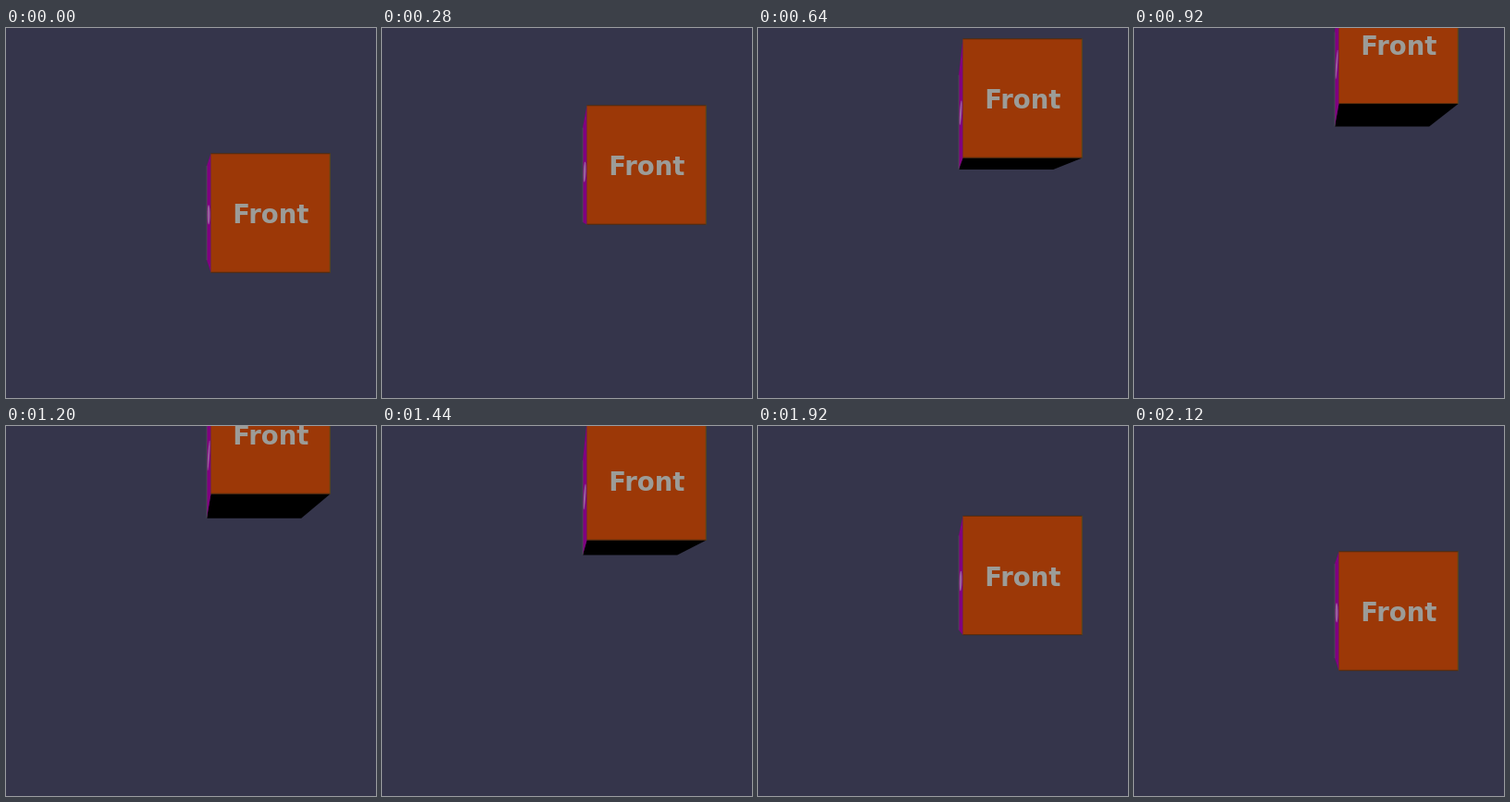
Write an HTML page that moves like this. It is 400 px wide and 400 px high and loops after 2.16 s.

```html
<!DOCTYPE html>
<html lang="en">
<head>
<meta charset="utf-8">
<title>Moving cube</title>
<style>
  html, body { margin: 0; width: 100%; height: 100%; overflow: hidden; background: #35354b; }
  svg { display: block; width: 100vw; height: 100vh; }
  text { font: bold 27.5px "DejaVu Sans", Verdana, sans-serif; fill: #9c9c98; text-anchor: middle; }
  .edge { fill: none; stroke-width: .7; }
</style>
</head>
<body>
<svg viewBox="0 0 400 400">
  <polygon id="under" fill="#000"/>
  <polygon id="side" fill="#800080"/>
  <polygon id="label" fill="#a9a0b0" fill-opacity=".6"/>
  <polyline id="rim" class="edge" stroke="#4b5a55"/>
  <g id="front">
    <rect x="221.5" y="135.5" width="129" height="129" fill="#9c3807"/>
    <path class="edge" stroke="#32260f" d="M221.5 135.8H350.3M221.5 264.2H350.3"/>
    <path class="edge" stroke="#40501c" d="M350.2 135.5V264.5"/>
    <text x="286.4" y="211">Front</text>
  </g>
</svg>
<script>
const STEP = 40, LOOP = 2160;
const EYE = 200, BACK = 0.792;
const LEFT = 221.5, RIGHT = 350.5, TOP = 135.5, BOTTOM = 264.5;

// [step, upward shift of the front face]
const LIFT = [[0, 0], [1, 2], [7, 52], [14, 110.5], [16, 124], [23, 182.5],
              [27, 216], [36, 141], [42, 90], [44, 72], [52, 5], [53, 0]];

const el = id => document.getElementById(id);

function liftAt(step) {
  const i = Math.max(1, LIFT.findIndex(k => k[0] >= step));
  const [a, y0] = LIFT[i - 1], [b, y1] = LIFT[i];
  return y0 + (y1 - y0) * (step - a) / (b - a);
}

// Depth 0 is the front face, 1 the back face.
function project(x, y, depth) {
  const s = 1 / (1 + depth * (1 / BACK - 1));
  return [EYE + (x - EYE) * s, EYE + (y - EYE) * s];
}

function shape(id, points) {
  el(id).setAttribute("points", points.map(p => p.map(v => v.toFixed(2)).join()).join(" "));
}

function draw(time) {
  const lift = liftAt(Math.floor((time % LOOP) / STEP));
  const top = TOP - lift, bottom = BOTTOM - lift, mid = (top + bottom) / 2 + 2;
  const backTop = project(LEFT, top, 1), backBottom = project(LEFT, bottom, 1);

  el("front").setAttribute("transform", `translate(0 ${-lift})`);
  shape("side", [[LEFT, top], backTop, backBottom, [LEFT, bottom]]);
  shape("rim", [backTop, backBottom]);
  shape("under", bottom < EYE
    ? [[LEFT, bottom], [RIGHT, bottom], project(RIGHT, bottom, 1), backBottom]
    : []);
  shape("label", Array.from({ length: 20 }, (_, i) => {
    const a = i * Math.PI / 10;
    return project(LEFT, mid + 12 * Math.sin(a), 0.5 + 0.32 * Math.cos(a));
  }));
}

const start = performance.now();
function tick() {
  draw(performance.now() - start);
  requestAnimationFrame(tick);
}
tick();
</script>
</body>
</html>
```
